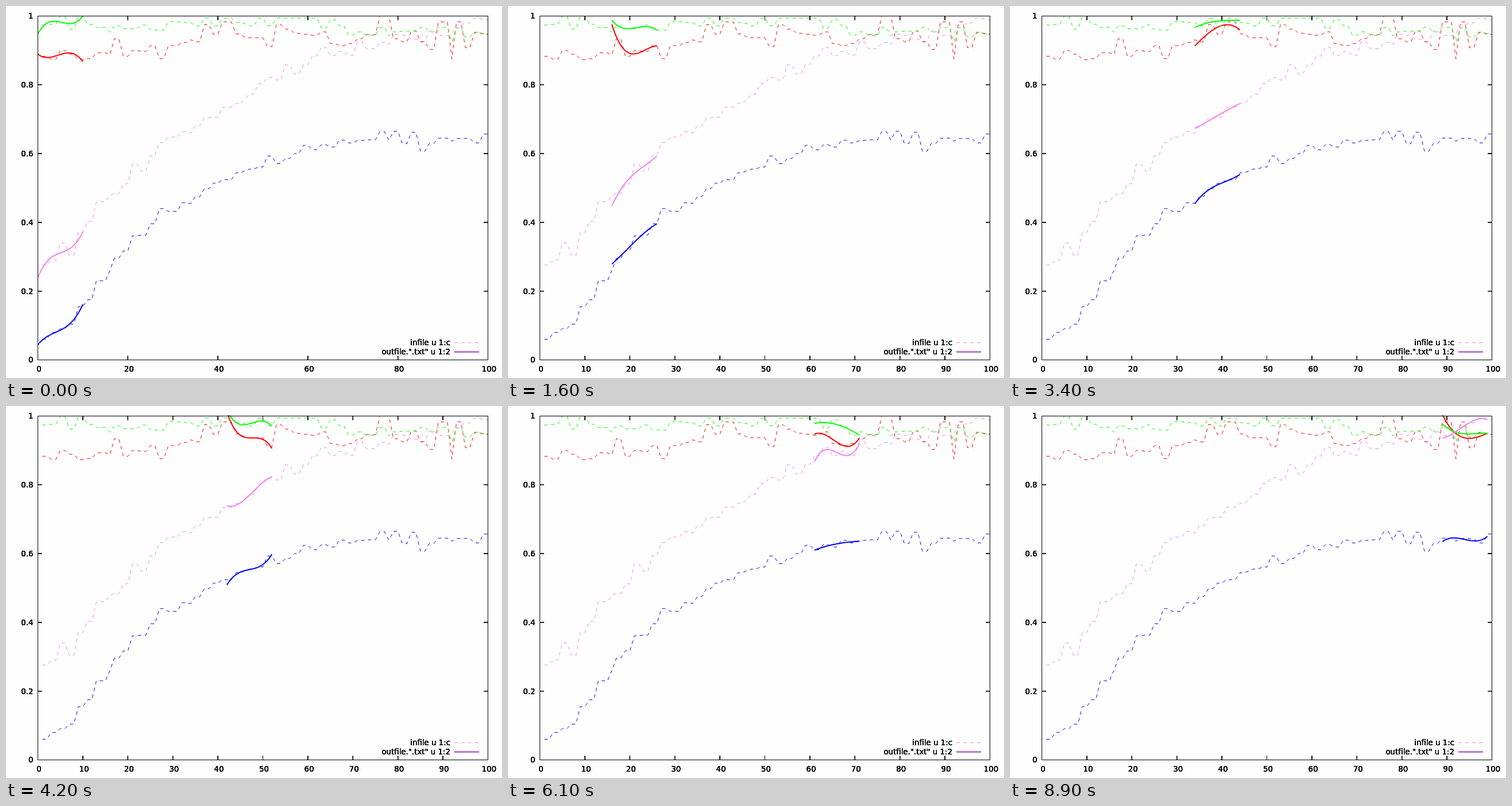
These frames come from a looping animation (864 by 648 pixels, 9000 ms). An HTML page:

```html
<!DOCTYPE html>
<html lang="en">
<head>
<meta charset="utf-8">
<title>Sliding cubic fit</title>
<style>
  html, body { margin: 0; width: 100%; height: 100%; overflow: hidden; background: #fefefe; }
  svg { display: block; width: 864px; height: 648px; }
  path { fill: none; }
  text { font: 13.33px "DejaVu Sans", sans-serif; fill: #000; }
  .dashed { stroke-width: 1; stroke-dasharray: 6 6; }
  .solid { stroke-width: 2; stroke-linejoin: round; }
  .axis { stroke: #000; stroke-width: 1; }
</style>
</head>
<body>
<svg id="stage" viewBox="0 0 864 648">
  <clipPath id="plot"><rect x="54" y="16" width="787" height="602"/></clipPath>
</svg>
<script>
const STEP = 100, FRAMES = 90, WINDOW = 10;
const stage = document.getElementById('stage');

// Each sample is held from its start until the next start.
const late = new Set([15, 31, 33, 43, 45, 75, 77, 91]);
const starts = Array.from({ length: 50 }, (_, i) => 2 * i + 1).map(n => late.has(n) ? n + 1 : n);

const series = [
  { color: '#f00', samples: [
    883, 874, 900, 889, 873, 876, 893, 887, 934, 883,
    900, 897, 914, 876, 914, 923, 931, 925, 975, 947,
    983, 948, 938, 937, 937, 911, 975, 962, 950, 947,
    944, 954, 920, 914, 920, 934, 946, 1000, 1000, 934,
    925, 957, 925, 903, 983, 875, 983, 908, 952, 947] },
  { color: '#0f0', samples: [
    974, 976, 1000, 962, 1000, 976, 967, 953, 972, 963,
    963, 974, 960, 959, 984, 981, 981, 971, 994, 971,
    994, 981, 978, 971, 994, 972, 994, 994, 994, 994,
    994, 964, 990, 972, 944, 954, 943, 967, 942, 954,
    956, 956, 967, 954, 967, 924, 966, 938, 953, 949] },
  { color: '#00f', samples: [
    60, 80, 91, 104, 155, 175, 230, 260, 296, 317,
    361, 363, 396, 440, 432, 457, 455, 475, 498, 514,
    524, 544, 550, 555, 561, 593, 571, 586, 600, 624,
    611, 626, 619, 639, 631, 638, 640, 664, 639, 665,
    629, 662, 607, 630, 645, 636, 644, 644, 631, 657] },
  { color: '#ee82ee', samples: [
    276, 290, 340, 304, 371, 403, 460, 478, 484, 512,
    570, 549, 594, 632, 648, 664, 660, 681, 704, 706,
    735, 746, 757, 773, 803, 821, 814, 858, 831, 859,
    884, 909, 885, 897, 886, 926, 905, 923, 917, 947,
    944, 933, 927, 957, 943, 948, 974, 980, 994, 989] }
];

const px = x => 55.5 + 7.84 * x;
const py = y => 616.5 - 599 * y;
const polyline = points =>
  'M' + points.map(([x, y]) => px(x).toFixed(2) + ' ' + py(y).toFixed(2)).join('L');

function add(parent, tag, attrs, text = '') {
  const node = document.createElementNS('http://www.w3.org/2000/svg', tag);
  for (const name in attrs) node.setAttribute(name, attrs[name]);
  node.textContent = text;
  return parent.appendChild(node);
}

function label(parent, x, y, anchor, text) {
  add(parent, 'text', { x, y, 'text-anchor': anchor }, text);
}

function xTick(parent, value) {
  add(parent, 'path', { class: 'axis', d: `M${px(value)} 616.5v-7M${px(value)} 17.5v7` });
  label(parent, px(value) + 2, 637, 'middle', value);
}

// The four plots lie on top of each other, each with its own axes and key.
for (const s of series) {
  s.values = Array.from({ length: 100 }, (_, i) =>
    s.samples[starts.findLastIndex(start => start <= i + 1)] / 1000);

  const layer = add(stage, 'g', {});
  const curves = add(layer, 'g', { 'clip-path': 'url(#plot)', stroke: s.color });
  add(curves, 'path', { class: 'dashed', d: polyline(s.values.map((v, i) => [i + 1, v])) });
  s.fit = add(curves, 'path', { class: 'solid' });

  label(layer, 774, 590.5, 'end', 'infile u 1:c');
  add(layer, 'path', { class: 'dashed', stroke: s.color, d: 'M781 586.5h42' });
  label(layer, 774, 606.5, 'end', 'outfile.".txt" u 1:2');
  add(layer, 'path', { class: 'solid', stroke: s.color, d: 'M781 602.5h43' });

  add(layer, 'path', { class: 'axis', d: 'M55.5 17.5H839.5V616.5H55.5Z' });
  for (let i = 0; i <= 5; i++) {
    const y = py(i / 5);
    add(layer, 'path', { class: 'axis', d: `M55.5 ${y}h7M839.5 ${y}h-7` });
    label(layer, 47.5, y + 4.8, 'end', i / 5);
  }
  for (let x = 0; x <= 100; x += 20) xTick(layer, x);
  s.minor = add(layer, 'g', {});
  for (let x = 10; x < 100; x += 20) xTick(s.minor, x);
}

// Polynomials orthogonal over ten evenly spaced points centred on zero.
const basis = [() => 1, t => t, t => t * t - 8.25, t => t ** 3 - 14.65 * t];

function cubicFit(values) {
  const center = (WINDOW - 1) / 2;
  const weights = basis.map(p => {
    let dot = 0, norm = 0;
    values.forEach((v, i) => {
      const b = p(i - center);
      dot += v * b;
      norm += b * b;
    });
    return dot / norm;
  });
  return t => basis.reduce((sum, p, i) => sum + weights[i] * p(t), 0);
}

function draw(time) {
  const first = Math.floor(time / STEP) % FRAMES;
  for (const s of series) {
    const fit = cubicFit(s.values.slice(first, first + WINDOW));
    const points = Array.from({ length: 51 }, (_, i) => {
      const x = i * WINDOW / 50;
      return [first + x, fit(x - 5.5)];
    });
    s.fit.setAttribute('d', polyline(points));
    s.minor.setAttribute('visibility', first ? 'visible' : 'hidden');
  }
}

const origin = performance.now();
function tick() {
  draw(performance.now() - origin);
  requestAnimationFrame(tick);
}
tick();
</script>
</body>
</html>
```
